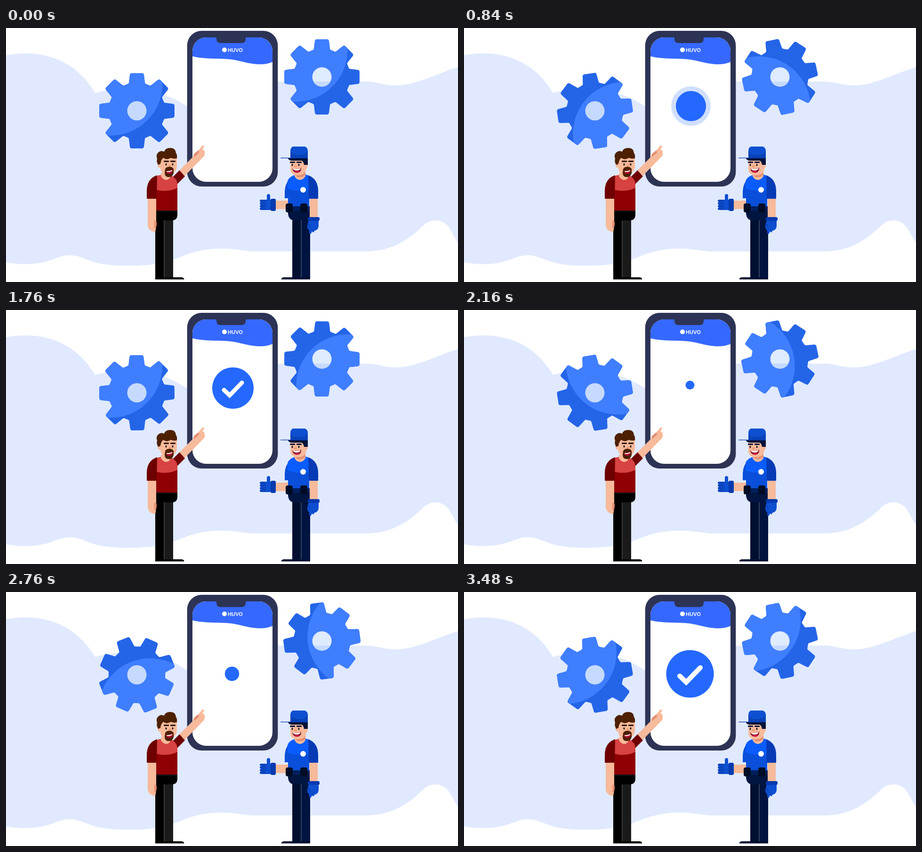
An HTML page with a canvas for the animation above (3520 ms loop, 960 by 540 pixels).

```html
<!DOCTYPE html>
<html lang="en">
<head>
<meta charset="utf-8">
<title>Service app</title>
<style>
  html, body { margin: 0; width: 100%; height: 100%; overflow: hidden; background: #fff; }
  canvas { display: block; width: 960px; height: 540px; }
</style>
</head>
<body>
<canvas id="stage" width="960" height="540"></canvas>
<script>
const ctx = document.getElementById('stage').getContext('2d');
const LOOP = 3520, STEP = 40, TAU = Math.PI * 2;
const LEFT_SPEED = 0.2042, RIGHT_SPEED = 0.307; // degrees per ms
const SKIN = '#f7ba9a', SKIN_SHADE = '#e58f74', HAIR = '#4d2001', FRAME = '#2d3354', BLUE = '#2468ff';

const clamp = v => Math.max(0, Math.min(1, v));
const progress = (t, from, to) => clamp((t - from) / (to - from));
const easeInOut = u => u < 0.5 ? 2 * u * u : 1 - 2 * (1 - u) ** 2;

function shape(color, d) {
  ctx.fillStyle = color;
  ctx.fill(new Path2D(d));
}
function line(color, width, d) {
  ctx.strokeStyle = color;
  ctx.lineWidth = width;
  ctx.stroke(new Path2D(d));
}
function rect(color, x, y, w, h, r = 0) {
  ctx.fillStyle = color;
  ctx.beginPath();
  ctx.roundRect(x, y, w, h, r);
  ctx.fill();
}
function oval(color, x, y, rx, ry = rx) {
  ctx.fillStyle = color;
  ctx.beginPath();
  ctx.ellipse(x, y, rx, ry, 0, 0, TAU);
  ctx.fill();
}

function drawBackground() {
  ctx.fillStyle = '#fff';
  ctx.fillRect(0, 0, 960, 540);
  shape('#e0e9ff', `M0 58C70 45 145 63 189 138C255 119 330 128 385 167L480 114H765
    C790 114 800 122 829 122C870 122 915 97 960 83V457C950 442 946 431 939 422
    C926 405 901 405 886 420C850 456 812 475 765 475H530C505 475 490 469 458 469
    C400 469 372 488 345 496C305 508 220 509 185 497C160 488 150 483 135 483
    C108 483 95 502 40 502Q20 502 0 498Z`);
}

// Eight flared teeth on a round body, the diagonal ones slightly longer.
const gearPath = (() => {
  const points = [];
  for (let i = 0; i < 8; i++) {
    const c = Math.cos(i * TAU / 8), s = Math.sin(i * TAU / 8);
    const tip = i % 2 ? 81.3 : 79.9;
    for (const [x, y] of [[-17.2, -58], [-14.5, -tip], [14.5, -tip], [17.2, -58]]) {
      points.push([x * c - y * s, x * s + y * c]);
    }
  }
  const path = new Path2D();
  path.moveTo(0, -79.9);
  for (let i = 2; i < 34; i++) {
    const a = points[i % 32], b = points[(i + 1) % 32];
    path.arcTo(...a, ...b, i % 4 === 1 || i % 4 === 2 ? 4.5 : 3);
  }
  path.closePath();
  return path;
})();

function drawGear(x, y, degrees) {
  ctx.save();
  ctx.translate(x, y);
  ctx.rotate(degrees * TAU / 360);
  ctx.fillStyle = '#2465e8';
  ctx.fill(gearPath);
  ctx.clip(gearPath);
  oval('#3f7eff', -55.5, -57.5, 110);
  ctx.restore();
}

function drawPhone() {
  rect(FRAME, 384.7, 6, 192.6, 331, 31);
  ctx.save();
  ctx.beginPath();
  ctx.roundRect(396, 20, 170, 307, 29);
  ctx.clip();
  rect('#fff', 396, 20, 170, 307);
  const wave = 'M396 20H566V72Q555 77 541 77C510 77 495 66 462 65.5C440 65 415 65 396 60Z';
  line('#dce6ff', 1.5, wave);
  shape('#3568ff', wave);
  ctx.restore();
  shape(FRAME, 'M443 19Q447 19 447 23Q447 32 456 32H500Q509 32 509 23Q509 19 513 19Z');
  oval('#fff', 464, 46.5, 5);
  ctx.fillStyle = '#fff';
  ctx.font = 'bold 11px "Liberation Sans", Arial, sans-serif';
  ctx.fillText('HUVO', 471, 50.5);
}

function drawCustomer() {
  // Raised arm
  shape(SKIN, 'M366 305L398 273Q400 267 406 263L417 250Q420 249 421 252L417 258Q422 259 422 264V268Q422 272 418 275L380 314Z');
  shape(SKIN_SHADE, 'M398 274Q397 270 401 266L407 261Q411 261 410 265L404 271Z');
  shape('#6f0000', 'M355 316L368.5 302.5L380 315.5L364 331.5Z');
  // Legs and shoes
  rect('#000', 317, 400, 20, 134);
  rect('#1a1a1a', 337, 404, 18, 130);
  rect('#777', 335.5, 408, 1, 122);
  shape('#000', 'M317 530H372Q378 530 378.5 534.5H317Z');
  shape('#000', 'M317 386H364V397Q364 409 352 409H317Z');
  line('#292929', 1, 'M320 389.5H364');
  // Hanging arm
  shape(SKIN, 'M301 362H319V408Q320 420 317 434Q301 431 301 418Z');
  shape(SKIN_SHADE, 'M315 410Q320 408 320 416Q320 424 315 426Z');
  // Shirt
  shape('#8f0004', 'M320 315Q338 308 353 315Q364 321 364 333V388H319V330Z');
  shape('#d74242', 'M320 315Q338 308 353 315Q364 321 364 333V340Q343 350 320 344Z');
  shape('#6f0000', 'M321 313Q299 320 299 347V363H320Z');
  // Head
  shape(SKIN, 'M329 308V315Q334 323 340 323Q347 323 350 315V308Z');
  shape(SKIN, 'M328 274H363V294Q362 306 352 311Q332 315 328 300Z');
  oval(SKIN, 326, 291, 4, 6);
  shape(HAIR, `M323 291Q319 283 321 278Q318 270 323 265Q329 259 336 263Q338 255 349 255
    Q360 255 361 266Q364 269 363 277Q356 279 350 276Q341 282 334 276Q329 280 328 289Z`);
  rect('#291000', 335, 282, 11, 3, 1);
  rect('#291000', 349, 282, 11, 3, 1);
  oval('#201010', 340, 290, 1.5, 2.5);
  oval('#201010', 354, 290, 1.5, 2.5);
  oval('#ee9d7b', 348, 292.5, 3, 2.5);
  shape(HAIR, 'M338 300Q340 295 347 295Q354 295 356 300V308Q354 317 346 317Q337 317 337 308Z');
  shape('#b90d32', 'M339 304Q347 305 354 301Q354 310 346 310Q341 309 339 304Z');
  shape('#fff', 'M341 304Q347 305 353 302V304Q347 307 342 306Z');
}

function drawWorker() {
  // Legs and shoes
  rect('#000f30', 608, 400, 19, 134);
  rect('#00143f', 627, 400, 19, 134);
  rect('#64718f', 626.5, 408, 1, 122);
  shape('#000f30', 'M646 530H591Q585 530 584.5 534.5H646Z');
  shape('#001540', 'M599 386H645V409H612Q600 408 599 394Z');
  // Thumbs-up arm
  rect(SKIN, 570, 367, 29, 18);
  rect('#0d4fd0', 541, 365, 24, 22, 4);
  rect('#0d4fd0', 554, 353, 7, 18, 3.5);
  for (let i = 0; i < 4; i++) rect('#0b44bd', 539, 365 + i * 5.6, 13, 5, 2.5);
  rect('#063aaf', 562, 363, 11, 26, 3);
  // Hanging arm
  rect(SKIN, 645, 361, 17, 44);
  shape('#0d4fd0', 'M643 408H664V421Q663 430 655 431L654 434Q651 435 650 432L648 437Q645 439 644 435V430Q639 427 640 420Z');
  line('#073baf', 1.5, 'M641 417Q647 419 645 426M650 432L651 427');
  rect('#063aaf', 641, 402, 25, 8, 3);
  // Shirt
  shape('#0a4fd9', 'M599 325Q603 313 622 311Q636 310 644 315V380H599V362H592V347Q593 333 599 325Z');
  shape('#0a5cff', 'M598 325Q603 313 622 311Q636 310 644 315V344Q619 349 598 341Z');
  shape('#063bb5', 'M642 313Q663 321 663 347V363H643Z');
  oval('#fff', 631, 344, 6);
  // Belt
  rect('#001f5c', 599, 379, 46, 10);
  for (const x of [594, 625]) {
    rect('#000c25', x, 373, 15, 19, 4);
    line('#00183f', 1, `M${x + 1} 379.5h13`);
  }
  // Head
  shape(SKIN, 'M613 306H636V315Q631 323 624 323Q616 322 613 315Z');
  shape(SKIN_SHADE, 'M614 312Q628 313 636 306V312Q630 319 619 317Z');
  shape(SKIN, 'M604 277H638V299Q636 312 622 313Q607 314 604 302Z');
  oval(SKIN, 637, 292, 4, 6);
  shape('#00133a', 'M599 277H641V291H633Q632 284 628 282H606Q600 281 599 277Z');
  rect('#00133a', 603, 284, 11, 3, 1);
  rect('#00133a', 617, 284, 11, 3, 1);
  oval('#101325', 608, 291, 1.5, 2.5);
  oval('#101325', 622, 291, 1.5, 2.5);
  oval('#ee9d7b', 615, 294, 3, 2.5);
  shape('#7d0b24', 'M608 299Q618 301 627 297Q627 308 617 308Q610 307 608 299Z');
  shape('#fff', 'M609 299Q618 301 626 298Q625 303 617 303Q611 303 609 299Z');
  shape('#d51e48', 'M612 305Q618 303 624 304Q621 308 617 308Q614 308 612 305Z');
  // Cap
  shape('#0d4fd0', 'M609 252H635Q641 255 641 261V277H604V261Q604 255 609 252Z');
  shape('#0943b8', 'M604 261Q607 270 622 270Q637 270 641 261V277H604Z');
  line('#063aaf', 1.3, 'M583 276.4H641');
}

// A dot bounces, swells into a disc behind a pale halo, then gets its tick.
function drawConfirm(t, x, y, radius) {
  if (t < 40) return;
  const swing = progress(t, 92, 663);
  const grow = easeInOut(progress(t, 695, 940));
  const halo = easeInOut(progress(t, 730, 860));
  const pop = progress(t, 0, 120);
  ctx.save();
  ctx.translate(x, y - 0.42 * radius * Math.sin(swing * TAU));
  if (halo > 0) oval('#d0dfff', 0, 0, halo * radius);
  oval(BLUE, 0, 0, radius * pop * (0.187 + 0.813 * grow));
  const tick = easeInOut(progress(t, 940, 1160));
  if (tick > 0) {
    ctx.scale(radius / 44, radius / 44);
    ctx.lineCap = 'round';
    ctx.lineWidth = 9;
    ctx.strokeStyle = '#fff';
    const first = clamp(tick * 3), second = clamp(tick * 1.5 - 0.5);
    ctx.beginPath();
    ctx.moveTo(-19, 4);
    ctx.lineTo(-19 + 12 * first, 4 + 11.5 * first);
    if (second > 0) ctx.lineTo(-7 + 26 * second, 15.5 - 27 * second);
    ctx.stroke();
  }
  ctx.restore();
}

function draw(t) {
  drawBackground();
  drawGear(278, 176, t * LEFT_SPEED);
  oval('#c6daff', 278, 176, 20.5);
  drawGear(671, 104, t * RIGHT_SPEED);
  oval('#dfebff', 671, 104, 20.5);
  shape('#c6daff', 'M653 114H689A20.5 20.5 0 0 1 653 114Z');
  drawPhone();
  if (t < 2000) drawConfirm(t, 482, 166, 44);
  else drawConfirm(t - 2000, 480, 174, 50.5);
  drawCustomer();
  drawWorker();
}

let start;
function tick(now) {
  start ??= now;
  draw(Math.floor(((now - start) % LOOP) / STEP) * STEP);
  requestAnimationFrame(tick);
}
draw(0);
requestAnimationFrame(tick);
</script>
</body>
</html>
```
